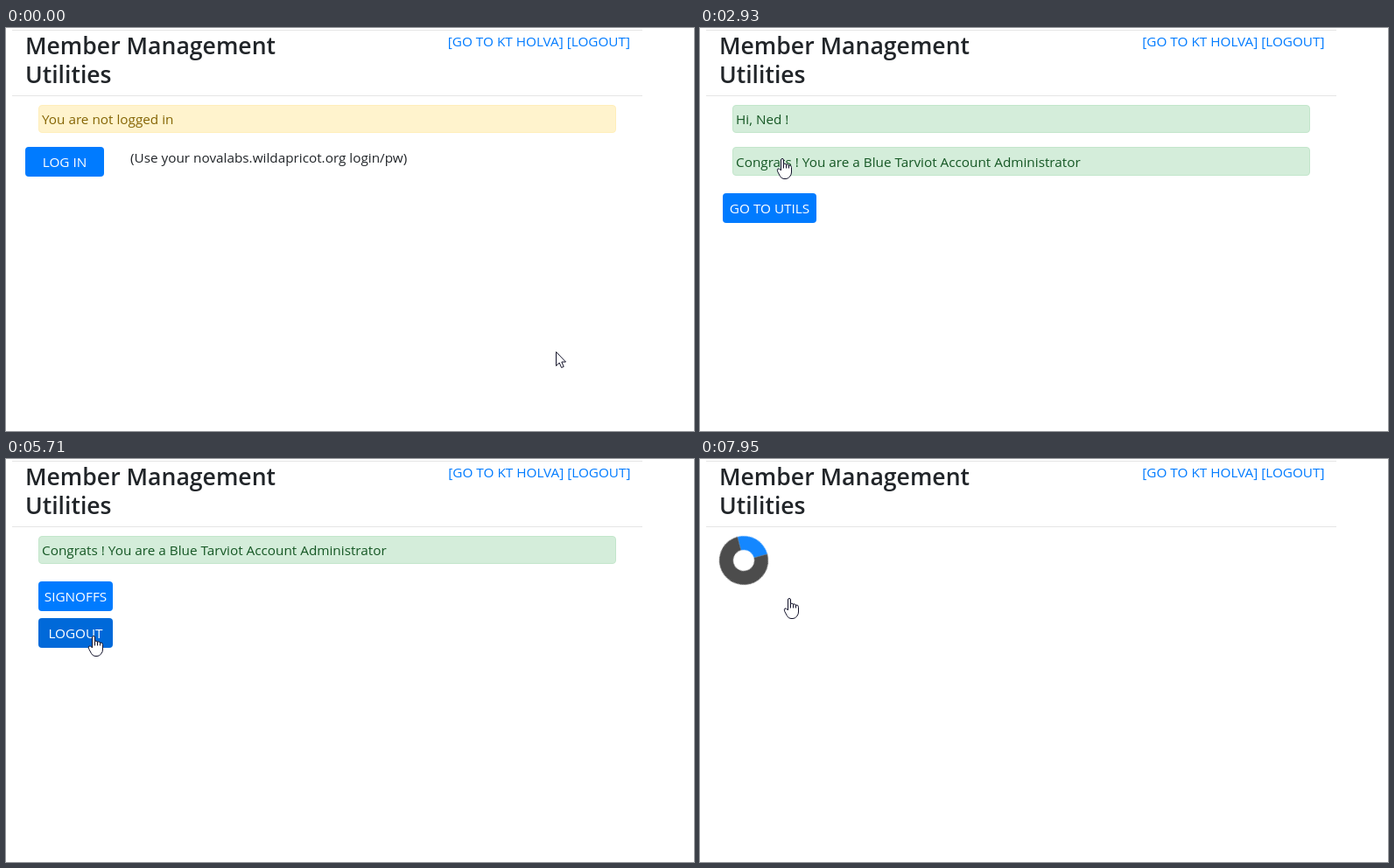
Write an HTML page that moves like this. It is 786 px wide and 461 px high and loops after 8 s.

```html
<!DOCTYPE html>
<html lang="en">
<head>
<meta charset="utf-8">
<title>Member Management Utilities</title>
<style>
  html, body { margin: 0; width: 100%; height: 100%; overflow: hidden; background: #fff; }
  body { font: 15.3px/24px "Open Sans", "Noto Sans", sans-serif; color: #212529; white-space: nowrap; }
  .stage { position: relative; width: 786px; height: 461px; overflow: hidden; }
  .stage * { position: absolute; box-sizing: border-box; }

  /* One percent of the loop is 80 ms. */
  .page, .btn, .links, .cursor, .cursor g, .spinner { animation: 8s step-end infinite; }

  .rule { left: 7px; width: 720px; height: 1px; background: #e5e5e5; }
  h1 { left: 22px; top: 4px; margin: 0; font-size: 26.6px; font-weight: 600; line-height: 33px; }
  .links { right: 73px; top: 3px; color: #007bff; animation-name: links; }
  .links span { position: static; }
  .note { left: 142px; top: 136px; }

  .alert { left: 37px; top: 88px; width: 660px; height: 32px; padding-left: 3px;
    border: 1px solid #c3e6cb; border-radius: 4px; background: #d4edda; color: #155724; line-height: 30px; }
  .warn { border-color: #ffeeba; background: #fff3cd; color: #856404; }
  .second { top: 136px; height: 33px; line-height: 32px; }

  .btn { height: 34px; border-radius: 4px; background: #007bff; color: #fff; line-height: 34px; text-align: center; }
  .login { left: 22px; top: 136px; width: 90px; animation-name: login; }
  .utils { left: 26px; top: 189px; width: 107px; animation-name: utils; }
  .signoffs { left: 37px; top: 140px; width: 85px; animation-name: signoffs; }
  .logout { left: 37px; top: 182px; width: 85px; animation-name: logout; }

  .spinner { left: 22px; top: 88px; width: 56px; height: 56px; border: 16px solid #4c4c4c;
    border-top-color: #1487ff; border-radius: 50%; animation-name: spinner; }

  .p1 { animation-name: p1; }
  .p2 { animation-name: p2; }
  .p3 { animation-name: p3; }
  @keyframes p1 { 0% { visibility: visible } 36.625%, 100% { visibility: hidden } }
  @keyframes p2 { 0% { visibility: hidden } 36.625% { visibility: visible } 71.375%, 100% { visibility: hidden } }
  @keyframes p3 { 0% { visibility: hidden } 71.375% { visibility: visible } 95.5%, 100% { visibility: hidden } }
  @keyframes links { 0% { transform: none } 36.625%, 100% { transform: translateX(.5px) } }
  @keyframes spinner {
    0% { visibility: hidden; transform: none }
    98.375% { visibility: visible; transform: none }
    99.375%, 100% { visibility: visible; transform: rotate(30deg) }
  }

  @keyframes login {
    0% { background: #007bff; box-shadow: 0 0 0 0 #268fff00 }
    15.5% { background: #0074ee; box-shadow: 0 0 0 0 #268fff00 }
    16.5% { background: #0069d9; box-shadow: 0 0 0 0 #268fff00 }
    18.5% { background: #0069d9; box-shadow: 0 0 0 1px #268fff2b }
    19.5% { background: #0069d9; box-shadow: 0 0 0 2.1px #268fff55 }
    20.375%, 100% { background: #0069d9; box-shadow: 0 0 0 3.2px #268fff99 }
  }
  @keyframes utils {
    0% { background: #007bff; box-shadow: 0 0 0 0 #268fff00 }
    49.4% { background: #0074ee; box-shadow: 0 0 0 0 #268fff00 }
    50.4% { background: #0069d9; box-shadow: 0 0 0 0 #268fff00 }
    63.375% { background: #0069d9; box-shadow: 0 0 0 1px #268fff2b }
    64.4% { background: #0069d9; box-shadow: 0 0 0 2.1px #268fff55 }
    65.375%, 100% { background: #0069d9; box-shadow: 0 0 0 3.2px #268fff99 }
  }
  @keyframes signoffs {
    0% { background: #007bff; box-shadow: 0 0 0 0 #268fff00 }
    82.375% { background: #0072e9; box-shadow: 0 0 0 0 #268fff00 }
    83.375% { background: #0069d9; box-shadow: 0 0 0 0 #268fff00 }
    89.375% { background: #0069d9; box-shadow: 0 0 0 1.6px #268fff40 }
    90.5%, 100% { background: #0069d9; box-shadow: 0 0 0 3.2px #268fff99 }
  }
  @keyframes logout {
    0% { background: #0069d9 }
    81.375% { background: #006bde }
    82.375% { background: #0075f0 }
    83.375%, 100% { background: #007bff }
  }

  /* The cursor's origin is its hotspot. */
  .cursor { left: 0; top: 0; overflow: visible; fill: #fff; stroke: #12122a; animation-name: move; }
  .arrow { animation-name: arrow !important; }
  .beam { animation-name: beam !important; }
  .hand { animation-name: hand !important; }
  @keyframes move {
    0% { transform: translate(628px, 370px) }
    2.5% { transform: translate(623px, 366px) }
    7.5% { transform: translate(607px, 359px) }
    8.5% { transform: translate(559px, 340px) }
    9.5% { transform: translate(480px, 307px) }
    10.5% { transform: translate(384px, 268px) }
    11.5% { transform: translate(294px, 231px) }
    12.5% { transform: translate(220px, 201px) }
    13.5% { transform: translate(167px, 179px) }
    14.5% { transform: translate(130px, 164px) }
    15.5% { transform: translate(109px, 156px) }
    16.5% { transform: translate(98px, 151px) }
    17.5% { transform: translate(93px, 149px) }
    22.5% { transform: translate(94px, 149px) }
    44.5% { transform: translate(94px, 152px) }
    45.5% { transform: translate(95px, 157px) }
    46.5% { transform: translate(97px, 164px) }
    47.45% { transform: translate(98px, 173px) }
    48.45% { transform: translate(99px, 183px) }
    49.4% { transform: translate(99px, 190px) }
    50.4% { transform: translate(100px, 195px) }
    51.375% { transform: translate(100px, 198px) }
    54.25% { transform: translate(102px, 197px) }
    57.375% { transform: translate(101px, 199px) }
    58.4% { transform: translate(101px, 201px) }
    59.375% { transform: translate(101px, 202px) }
    68.5% { transform: translate(100px, 202px) }
    79.5% { transform: translate(101px, 196px) }
    80.4% { transform: translate(102px, 184px) }
    81.375% { transform: translate(103px, 167px) }
    82.375% { transform: translate(103px, 161px) }
    83.375% { transform: translate(102px, 160px) }
    84.375%, 100% { transform: translate(102px, 159px) }
  }
  @keyframes arrow {
    0% { visibility: visible } 15.5% { visibility: hidden }
    46.5% { visibility: visible } 49.4%, 100% { visibility: hidden }
  }
  @keyframes beam {
    0% { visibility: hidden } 44.5% { visibility: visible } 46.5%, 100% { visibility: hidden }
  }
  @keyframes hand {
    0% { visibility: hidden } 15.5% { visibility: visible }
    44.5% { visibility: hidden } 49.4%, 100% { visibility: visible }
  }
</style>
</head>
<body>
<div class="stage">
  <div class="rule" style="top:2px"></div>
  <h1>Member Management<br>Utilities</h1>
  <div class="links"><span>[GO TO KT HOLVA]</span> <span>[LOGOUT]</span></div>
  <div class="rule" style="top:77px"></div>

  <div class="page p1">
    <div class="alert warn">You are not logged in</div>
    <div class="btn login">LOG IN</div>
    <div class="note">(Use your novalabs.wildapricot.org login/pw)</div>
  </div>

  <div class="page p2">
    <div class="alert">Hi, Ned !</div>
    <div class="alert second">Congrats ! You are a Blue Tarviot Account Administrator</div>
    <div class="btn utils">GO TO UTILS</div>
  </div>

  <div class="page p3">
    <div class="alert">Congrats ! You are a Blue Tarviot Account Administrator</div>
    <div class="btn signoffs">SIGNOFFS</div>
    <div class="btn logout">LOGOUT</div>
  </div>

  <div class="spinner"></div>

  <svg class="cursor" width="20" height="24">
    <g class="arrow"><path d="M.5 .5V16.5L4.2 13L6.6 18.5L9.2 17.4L6.8 12H11.5Z"/></g>
    <g class="beam"><path fill="none" d="M-3 -7.5H-1L.5 -6.5L2 -7.5H4M.5 -6.5V6.5M-3 7.5H-1L.5 6.5L2 7.5H4"/></g>
    <g class="hand">
      <path d="M-1.5 14V2Q-1.5 .5 0 .5T1.5 2V6.5Q3 5.5 4.5 7Q6 6.3 7.5 8Q10.5 7.5 10.5 10.5V16Q10.5 19 8.5 21Q7 23.5 4 23.5H2Q-1 23.5 -2.5 20.5L-5.2 15.5Q-6.2 13 -5 12Q-3.5 11.2 -1.5 14Z"/>
      <path fill="none" d="M1.5 6.5V11.5M4.5 7V11.5M7.5 8V11.5"/>
    </g>
  </svg>
</div>
</body>
</html>
```
